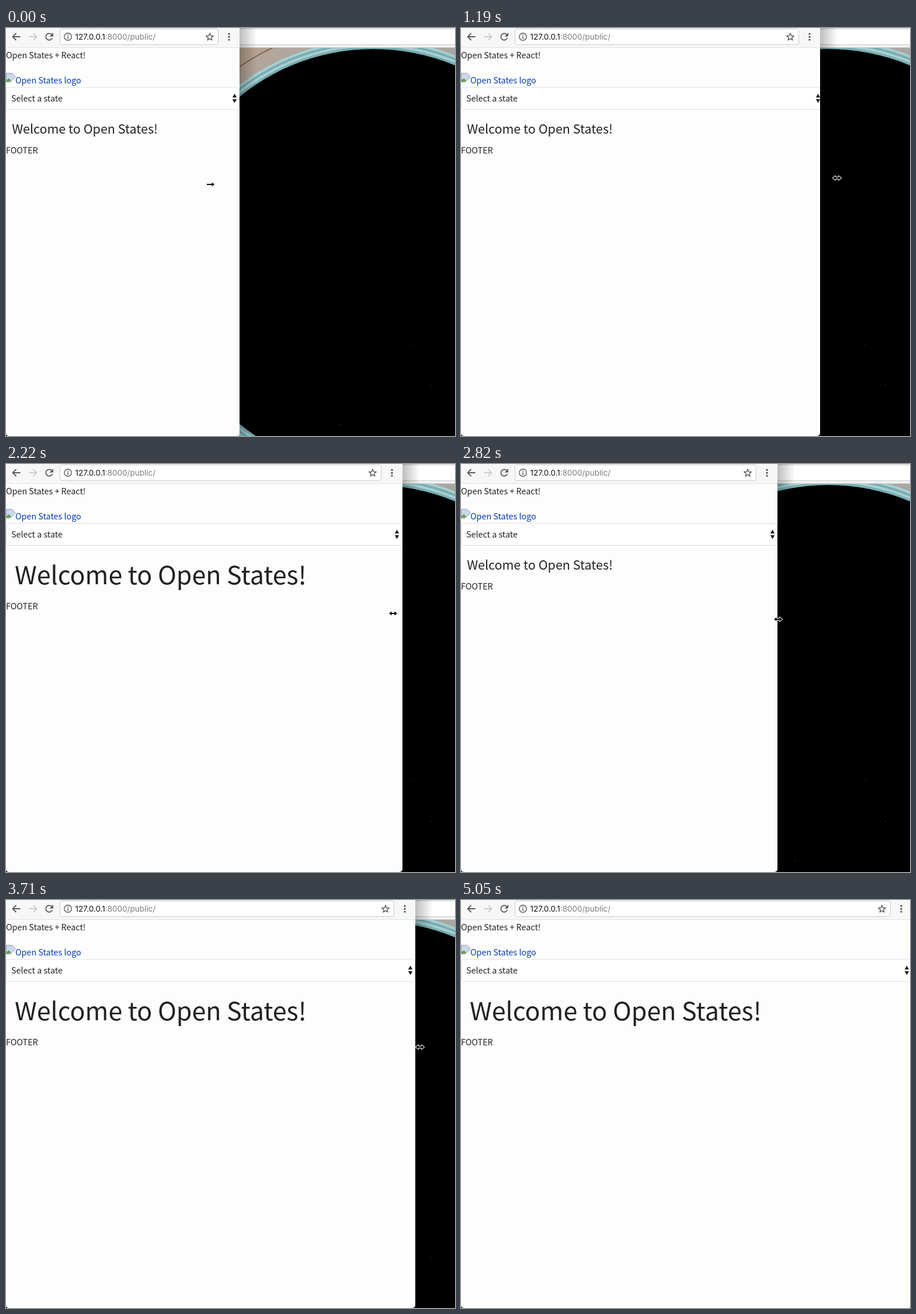
Recreate the animation shown at these times as an HTML page with a canvas. Size 769 px wide and 699 px high, loop 5.8 s.

```html
<!DOCTYPE html>
<html lang="en">
<head>
<meta charset="utf-8">
<title>Resizing a browser window</title>
<style>
  html, body { margin: 0; width: 100%; height: 100%; overflow: hidden; background: #000; }
  canvas { display: block; }
</style>
</head>
<body>
<canvas id="stage" width="769" height="699"></canvas>
<script>
const W = 769, H = 699, LOOP = 5800, STEP = 148.3;
const MIN_WIDTH = 400, BREAKPOINT = 640, RELEASE_STEP = 34;
const SANS = '"Noto Sans CJK JP", "Noto Sans CJK SC", "Noto Sans CJK", "Open Sans", sans-serif';
const BODY = 14.32;   // 16px text in this face's proportions
const INK = '#212121', ICON = '#5a5a5a';
const ctx = document.getElementById('stage').getContext('2d');
ctx.lineJoin = 'round';

// Where the drag turns round: [step, x]
const TURNS = [[-.2, 350], [12.4, 714], [13.3, 714], [19, 542], [28.6, 772]];

function dragX(step) {
  const next = TURNS.findIndex(([at]) => at > step);
  if (next < 0) return TURNS[TURNS.length - 1][1];
  const [from, a] = TURNS[next - 1], [to, b] = TURNS[next];
  const eased = (1 - Math.cos(Math.PI * (step - from) / (to - from))) / 2;
  return Math.round(a + (b - a) * eased);
}

const widthAt = step => Math.max(MIN_WIDTH, dragX(step));

function rect(x, y, w, h, color) {
  ctx.fillStyle = color;
  ctx.fillRect(x, y, w, h);
}

function disc(x, y, r, color) {
  ctx.fillStyle = color;
  ctx.beginPath();
  ctx.arc(x, y, r, 0, 7);
  ctx.fill();
}

function arc(x, y, r, from, to, width) {
  ctx.beginPath();
  ctx.arc(x, y, r, from, to);
  ctx.strokeStyle = ICON;
  ctx.lineWidth = width;
  ctx.stroke();
}

function roundBox(x, y, w, h, r, stroke) {
  ctx.beginPath();
  ctx.roundRect(x, y, w, h, r);
  ctx.fillStyle = '#fff';
  ctx.fill();
  ctx.strokeStyle = stroke;
  ctx.lineWidth = 1;
  ctx.stroke();
}

function trace(points, close) {
  ctx.beginPath();
  points.forEach(([x, y]) => ctx.lineTo(x, y));
  if (close) ctx.closePath();
}

function shape(points, color) {
  trace(points, true);
  ctx.fillStyle = color;
  ctx.fill();
}

function line(points, color, width = 1.8, close = false) {
  trace(points, close);
  ctx.strokeStyle = color;
  ctx.lineWidth = width;
  ctx.stroke();
}

function text(str, x, y, size = BODY, color = INK, family = SANS) {
  ctx.font = `${size}px ${family}`;
  ctx.fillStyle = color;
  ctx.fillText(str, x, y);
  return x + ctx.measureText(str).width;
}

function gradient(x0, x1, ...colors) {
  const fill = ctx.createLinearGradient(x0, 0, x1, 0);
  colors.forEach((color, i) => fill.addColorStop(i / (colors.length - 1), color));
  return fill;
}

function drawPlanet() {
  const cx = 629, cy = 398, radius = 362;
  rect(0, 34, W, H, gradient(400, 620, '#b9a38f', '#aaa6a2'));
  disc(cx, cy, radius + 42, '#806455');
  disc(cx, cy, radius + 40, gradient(400, 620, '#b4a69a', '#aaa6a2'));
  for (let i = 4; i > 0; i--) disc(cx, cy, radius + i * 4, i % 2 ? '#78aeb3' : '#a9cfd1');
  disc(cx, cy, radius, '#000');

  let seed = 7;
  const random = () => (seed = seed * 16807 % 2147483647) / 2147483647;
  for (let i = 0; i < 40; i++) {
    rect(490 + random() * 279, 500 + random() * 190, 1.5, 1.5, '#02021a');
  }
  for (const [x, y] of [[692, 541], [726, 612], [571, 679]]) rect(x, y, 1.5, 1.5, '#263a62');
}

function drawBackground(edge) {
  drawPlanet();
  rect(0, 0, W, 34, '#f1f1f1');
  rect(0, 1, W, 27, '#fff');
  for (const y of [1, 28, 33]) rect(0, y, W, 1, '#cbcbcb');
  rect(edge, 0, 30, H, gradient(edge, edge + 30, 'rgba(0,0,0,.26)', 'rgba(0,0,0,.13)', 'rgba(0,0,0,0)'));
  rect(0, H - 8, 8, 8, '#333');
}

function drawArrow(x, direction, color) {
  const tip = x + 6.5 * direction, head = x + .5 * direction;
  line([[x - 6.5 * direction, 15], [tip, 15]], color);
  line([[head, 9], [tip, 15], [head, 21]], color);
}

function drawToolbar(edge) {
  rect(0, 0, edge, 33, '#f7f7f7');
  rect(0, 33, edge, 1, '#e2e2e2');
  drawArrow(18, -1, ICON);
  drawArrow(46, 1, '#cdcdcd');
  arc(74, 15, 5.7, .35, 5.5, 1.8);
  shape([[81, 8], [81, 14.5], [74.5, 14.5]], ICON);

  roundBox(92.5, 1.5, edge - 129, 27, 3.5, '#cbcbcb');
  arc(106, 15, 6.2, 0, 7, 1.4);
  rect(105.2, 11.3, 1.6, 1.7, ICON);
  rect(105.2, 14.2, 1.6, 4.6, ICON);
  const hostEnd = text('127.0.0.1', 118.5, 20, 13.5, '#111', 'Inter, sans-serif');
  text(':8000/public/', hostEnd, 20, 13.5, '#7d7d7d', 'Inter, sans-serif');

  const star = Array.from({ length: 10 }, (_, i) => {
    const angle = i * Math.PI / 5 - Math.PI / 2, r = i % 2 ? 2.8 : 6.7;
    return [edge - 51 + r * Math.cos(angle), 15.5 + r * Math.sin(angle)];
  });
  line(star, ICON, 1.4, true);
  for (let i = -1; i <= 1; i++) disc(edge - 18, 15.2 + i * 4.9, 1.7, ICON);
}

function drawBrokenImage() {
  const sheet = [[.5, 77.5], [10.5, 77.5], [15.5, 82.5], [15.5, 85], [7, 92.5], [.5, 92.5]];
  shape(sheet, '#c9d8f0');
  shape([[1, 92], [1, 89], [5, 86], [9, 90], [7, 92]], '#62a752');
  line(sheet, '#a0a0a0', 1, true);
}

function drawPage(width) {
  text('Open States + React!', 0, 52);
  drawBrokenImage();
  text('Open States logo', 16, 95, BODY, '#0039b8');

  roundBox(.5, 101.5, width - 1, 38, 4, '#dae0e9');
  text('Select a state', 9, 126);
  const x = width - 8.5;
  for (const side of [-1, 1]) {
    const base = 120.5 + 1.5 * side;
    shape([[x - 3.7, base], [x, base + 6.5 * side], [x + 3.7, base]], INK);
  }

  const wide = width >= BREAKPOINT;
  text('Welcome to Open States!', wide ? 15 : 10.2, wide ? 206 : 181, BODY * (wide ? 3 : 1.5));
  text('FOOTER', 0, wide ? 249 : 215);
}

function drawWindow(edge, pageWidth) {
  ctx.save();
  ctx.beginPath();
  ctx.roundRect(0, -20, edge, H + 20, 5);
  ctx.clip();
  rect(0, 0, edge, H, '#fdfdfd');
  drawPage(pageWidth);
  drawToolbar(edge);
  ctx.restore();
}

function drawCursor(x, growOnly) {
  const y = Math.round(Math.min(268, 266 - (x - 541) * .085));
  const right = [[2.5, -1], [2.5, -3.5], [7, 0], [2.5, 3.5], [2.5, 1]];
  const left = growOnly ? [[-6, 1], [-6, -1]] : right.map(([px, py]) => [-px, -py]);
  const outline = [...right, ...left].map(([px, py]) => [x + px, y + py]);
  line(outline, '#fff', 2, true);
  shape(outline, '#000');
}

function frame(now) {
  const step = Math.floor((now % LOOP + 4) / STEP);
  const lead = Math.min(step / 4, 6 / step);   // the pointer runs ahead of the window
  const edge = widthAt(step);
  drawBackground(edge);
  drawWindow(edge, widthAt(step + lead * lead / 5));
  if (step < RELEASE_STEP) drawCursor(dragX(step + lead), edge === MIN_WIDTH);
}

const start = performance.now();
function tick() {
  frame(performance.now() - start);
  requestAnimationFrame(tick);
}
tick();
</script>
</body>
</html>
```
